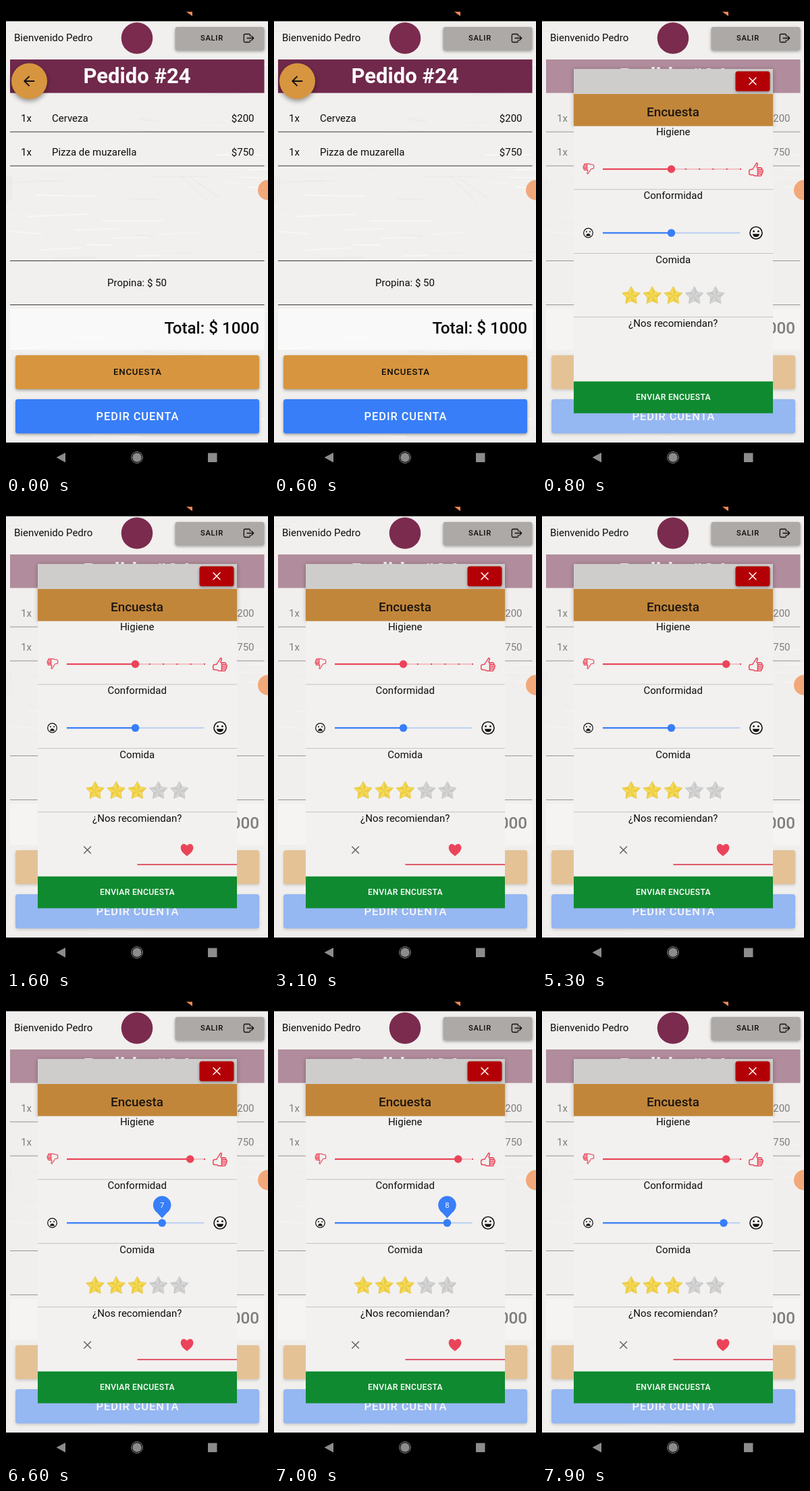
These frames come from a looping animation (388x690 px, 8000 ms). An HTML page with a canvas:

```html
<!DOCTYPE html>
<html lang="es">
<head>
<meta charset="utf-8">
<title>Encuesta</title>
<style>
html, body { margin: 0; width: 100%; height: 100%; overflow: hidden; background: #000; }
canvas { display: block; width: 388px; height: 690px; }
</style>
</head>
<body>
<canvas id="stage"></canvas>
<script>
const W = 388, H = 690, LOOP = 8000;
const canvas = document.getElementById('stage');
const ctx = canvas.getContext('2d');
const dpr = window.devicePixelRatio || 1;
canvas.width = W * dpr;
canvas.height = H * dpr;

const BG = '#f1f0ee', RED = '#eb445a', BLUE = '#387ef8', ORANGE = '#d7953f';
const OPEN_AT = 800, ICONS_AT = 900;

function rect(x, y, w, h, color) {
  ctx.fillStyle = color;
  ctx.fillRect(x, y, w, h);
}

function circle(x, y, r, color) {
  ctx.fillStyle = color;
  ctx.beginPath();
  ctx.arc(x, y, r, 0, Math.PI * 2);
  ctx.fill();
}

function text(str, x, y, size, { align = 'left', color = '#0c0c0c', weight = 400, gap = 0 } = {}) {
  ctx.font = `${weight} ${size}px Roboto, sans-serif`;
  ctx.textAlign = align;
  ctx.letterSpacing = gap + 'px';
  ctx.fillStyle = color;
  ctx.fillText(str, x + (align === 'center' ? gap / 2 : 0), y);
  ctx.letterSpacing = '0px';
}

function stroke(d, color, width) {
  ctx.strokeStyle = color;
  ctx.lineWidth = width;
  ctx.lineCap = ctx.lineJoin = 'round';
  ctx.stroke(new Path2D(d));
}

function withShadow(blur, dy, alpha, draw) {
  ctx.save();
  ctx.shadowColor = `rgba(0,0,0,${alpha})`;
  ctx.shadowBlur = blur * dpr;
  ctx.shadowOffsetY = dy * dpr;
  draw();
  ctx.restore();
}

function button(x, y, w, h, color) {
  withShadow(4, 1.8, 0.35, () => {
    ctx.fillStyle = color;
    ctx.beginPath();
    ctx.roundRect(x, y, w, h, 3.5);
    ctx.fill();
  });
}

function at(x, y, scale, draw, turn = 0) {
  ctx.save();
  ctx.translate(x, y);
  ctx.rotate(turn);
  ctx.scale(scale, scale);
  draw();
  ctx.restore();
}

// Faint painted-wood grain
function grain() {
  let seed = 11;
  const rnd = () => (seed = (seed * 16807) % 2147483647) / 2147483647;
  ctx.lineCap = 'round';
  for (let i = 0; i < 60; i++) {
    const x = rnd() * W, y = 25 + rnd() * 615, len = 20 + rnd() * 70;
    ctx.strokeStyle = i % 2 ? 'rgba(255,255,255,.45)' : 'rgba(120,112,105,.045)';
    ctx.lineWidth = 0.6 + rnd() * 1.6;
    ctx.beginPath();
    ctx.moveTo(x, y);
    ctx.lineTo(x + len, y + rnd() * 8 - 4);
    ctx.stroke();
  }
  stroke('M261 252L301 290M276 256L316 283', 'rgba(120,112,105,.09)', 1);
  for (let x = 2; x < 9; x += 3) stroke(`M${x} 252V${292 - x}`, 'rgba(120,112,105,.12)', 0.8);
}

function header() {
  text('Bienvenido Pedro', 12, 52, 15);
  circle(194, 47.5, 23.3, '#7b2b4e');
  button(250.5, 31, 132, 34.5, '#ada9a6');
  text('SALIR', 288, 51, 11.2, { weight: 500, gap: 0.7 });
  stroke('M361.5 44.5V43Q361.5 41.5 360 41.5H354Q352.3 41.5 352.3 43.2V51.8Q352.3 53.5 354 53.5H360Q361.5 53.5 361.5 52V50.5' +
    'M357 47.5H366.5M363.5 44.3L366.7 47.5L363.5 50.7', '#111', 1.3);
}

function order(dimmed) {
  rect(6, 79, 376.5, 49.5, '#70294b');
  text('Pedido #24', 194, 113.5, 31, { align: 'center', color: '#fff', weight: 700 });
  [['Cerveza', '$200', 171], ['Pizza de muzarella', '$750', 220.5]].forEach(([name, price, y]) => {
    text('1x', 22, y, 15);
    text(name, 68, y, 15);
    text(price, 367.5, y, 15, { align: 'right' });
  });
  for (const y of [185.5, 235.7, 376, 441]) rect(6, y, 376.5, 1, '#3a3a3a');
  text('Propina: $ 50', 194, 414, 15, { align: 'center' });
  withShadow(6, 0, 0, () => rect(6, 447, 377, 61, 'rgba(255,255,255,.65)'));
  text('Total: $ 1000', 375, 484, 24.2, { align: 'right', weight: 500 });
  button(14, 516, 361, 50, ORANGE);
  text('ENCUESTA', 194.5, 545, 13.2, { align: 'center', weight: 500, gap: 0.8 });
  button(14, 581, 361, 50.5, BLUE);
  text('PEDIR CUENTA', 194.5, 612, 16.4, { align: 'center', color: '#fff', weight: 500, gap: 0.95 });
  if (dimmed) {
    ctx.globalAlpha = 0.5;
    rect(0, 78, W, 567, BG);
    ctx.globalAlpha = 1;
    return;
  }
  withShadow(7, 3, 0.4, () => circle(34.5, 111, 26.5, ORANGE));
  stroke('M41.5 111H27.5M34 104.3L27.3 111L34 117.7', '#111', 1.9);
}

// Drawn on a 512 unit grid centred on zero
function thumb() {
  stroke('M64 202Q20 210 0 208Q-60 206 -96 176H-160Q-224 172 -224 112V64Q-224 0 -160 0H-130Q-112 0 -102 -16' +
    'Q-80 -60 -50 -100Q10 -190 16 -208Q62 -204 50 -160Q26 -100 22 -74Q22 -61 30 -61L160 -51', RED, 32);
  [[160, -51], [192, 16], [176, 80], [144, 144]].forEach(([right, y]) => {
    ctx.beginPath();
    ctx.roundRect(48, y, right - 16, 64, 32);
    ctx.stroke();
  });
}

function face(happy) {
  ctx.lineWidth = 1.6;
  ctx.strokeStyle = '#111';
  ctx.beginPath();
  ctx.arc(0, 0, 9, 0, Math.PI * 2);
  ctx.stroke();
  circle(-3.4, -2.4, 1.35, '#111');
  circle(3.4, -2.4, 1.35, '#111');
  ctx.fill(new Path2D(happy ? 'M-5 1.4H5Q4.4 6 0 6Q-4.4 6 -5 1.4Z' : 'M-4.4 6Q-4 1.2 0 1.2Q4 1.2 4.4 6Z'));
}

function star(x, y, on) {
  const pt = i => {
    const r = i % 2 ? 6.9 : 13.3, a = -Math.PI / 2 + i * Math.PI / 5;
    return [x + r * Math.cos(a), y + r * Math.sin(a)];
  };
  const shades = on ? ['#f5dc57', '#eccb45'] : ['#d6d6d6', '#c9c9c9'];
  ctx.beginPath();
  for (let i = 0; i < 10; i++) ctx.lineTo(...pt(i));
  ctx.closePath();
  ctx.lineJoin = 'round';
  ctx.lineWidth = 1.6;
  ctx.strokeStyle = on ? '#e6c64b' : '#c6c6c6';
  ctx.stroke();
  ctx.fillStyle = shades[0];
  ctx.fill();
  for (let i = 0; i < 10; i += 2) {
    ctx.fillStyle = shades[1];
    ctx.beginPath();
    ctx.moveTo(x, y);
    ctx.lineTo(...pt(i));
    ctx.lineTo(...pt(i + 1));
    ctx.fill();
  }
}

function slider(y, value, color, pin, ticks) {
  const x = 90 + value * 20.3;
  ctx.globalAlpha = 0.32;
  rect(90, y - 0.9, ticks ? 205 : 203.5, 1.8, color);
  ctx.globalAlpha = 1;
  if (ticks) for (let i = 0; i <= 10; i++) rect(90 + i * 20.3, y - 1, 2, 2, color);
  rect(90, y - 1.1, x - 90, 2.2, color);
  circle(x, y, 5.8, color);
  if (pin <= 0) return;
  at(x, y - 7, pin, () => {
    circle(0, -19.5, 13.3, color);
    ctx.fill(new Path2D('M-11 -12L0 0L11 -12Z'));
    text(String(Math.round(value)), 0, -15.6, 11.3, { align: 'center', color: '#fff' });
  });
}

const clamp = v => Math.max(0, Math.min(1, v));
const pinScale = (t, from, to) => Math.min(clamp((t - from) / 120), clamp((to - t) / 120));

function track(t, keys) {
  for (let i = 1; i < keys.length; i++) {
    const [t0, v0] = keys[i - 1], [t1, v1] = keys[i];
    if (t < t1) return v0 + (v1 - v0) * clamp((t - t0) / (t1 - t0));
  }
  return keys[keys.length - 1][1];
}

function survey(t) {
  withShadow(6, 1, 0.3, () => rect(47, 93, 295, 84, '#cfcdcc'));
  rect(47, 93, 295, 508, '#f2f1ef');
  rect(47, 93, 295, 37, '#cfcdcc');
  button(286.5, 96.5, 51, 29.5, '#b30006');
  stroke('M307 106L317 116M317 106L307 116', '#fff', 1.5);
  rect(47, 130, 295, 47.5, '#c2863a');
  text('Encuesta', 194, 163, 18.9, { align: 'center', weight: 500, color: '#1d1610' });

  [['Higiene', 191], ['Conformidad', 285], ['Comida', 379.5], ['¿Nos recomiendan?', 473.5]].forEach(([label, y], i) => {
    if (i) rect(47, y - 14.5, 295, 1, '#c4c3c1');
    text(label, 194.2, y, 15, { align: 'center' });
  });

  at(68.8, 240.5, 0.0355, thumb, Math.PI);
  at(317, 241.5, 0.046, thumb);
  const hygiene = 5 + [3700, 3900, 4100, 4500].filter(k => t >= k).length;
  slider(241, hygiene, RED, pinScale(t, 3600, 5200), true);

  at(68.5, 335.3, 0.76, () => face(false));
  at(317, 335.3, 1, () => face(true));
  const comfort = track(t, [[6000, 5], [6600, 6.95], [7200, 8.82]]);
  slider(335.3, comfort, BLUE, pinScale(t, 5750, 7600), false);

  for (let i = 0; i < 5; i++) star(132 + i * 31.2, 428.3, i < 3);

  if (t >= ICONS_AT) {
    stroke('M115.7 510.7L125.5 520.5M125.5 510.7L115.7 520.5', '#656463', 1.5);
    ctx.fillStyle = RED;
    ctx.fill(new Path2D('M268 524.7C262 520.5 258.7 516.5 258.7 512.3C258.7 506 265.5 505 268 509.6' +
      'C270.5 505 277.4 506 277.4 512.3C277.4 516.5 274 520.5 268 524.7Z'));
    rect(194.5, 536.3, 147.5, 1.8, '#dc4458');
  }
  rect(47, 554.7, 295, 47, '#108a30');
  text('ENVIAR ENCUESTA', 194.3, 582.3, 12.2, { align: 'center', color: '#fff', weight: 500, gap: 0.3 });
}

function systemBars() {
  rect(0, 0, W, 22.5, '#000');
  rect(0, 645, W, 45, '#000');
  ctx.fillStyle = '#ee8a55';
  ctx.fill(new Path2D('M267 8.5H276V15Z'));
  ctx.fillStyle = '#8c8c8c';
  ctx.fill(new Path2D('M74.5 667L88 660V674.5Z'));
  rect(299, 660.5, 13.5, 13.5, '#8c8c8c');
  circle(194, 667, 6.8, '#8c8c8c');
  ctx.lineWidth = 1;
  ctx.strokeStyle = '#8c8c8c';
  ctx.beginPath();
  ctx.arc(194, 667, 8.4, 0, Math.PI * 2);
  ctx.stroke();
}

function draw(t) {
  const open = t >= OPEN_AT;
  ctx.setTransform(dpr, 0, 0, dpr, 0, 0);
  rect(0, 0, W, H, BG);
  grain();
  order(open);
  header();
  if (open) survey(t);
  circle(388, 272, 15, '#f2a878');
  systemBars();
}

const start = performance.now();
function tick() {
  draw((performance.now() - start) % LOOP);
  requestAnimationFrame(tick);
}
tick();
</script>
</body>
</html>
```
